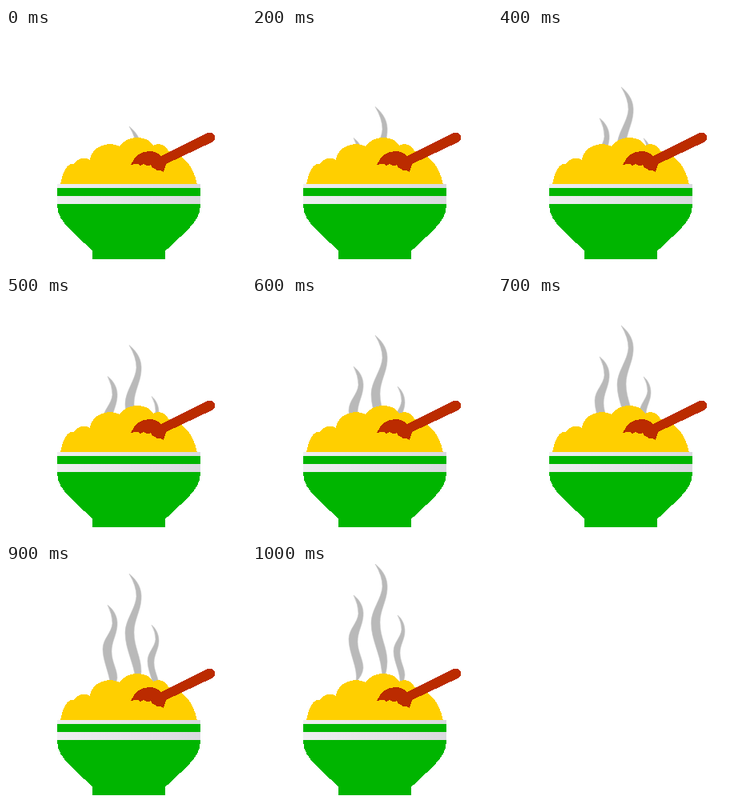
Recreate the animation shown at these times as an HTML page. Size 300 px wide and 300 px high, loop 1100 ms.

```html
<!DOCTYPE html>
<html lang="en">
<head>
<meta charset="utf-8">
<title>Steaming bowl</title>
<style>
html, body { margin: 0; width: 100%; height: 100%; overflow: hidden; background: #fff; }
svg { display: block; width: 300px; height: 300px; }
</style>
</head>
<body>
<svg viewBox="0 0 300 300">
  <defs>
    <linearGradient id="band">
      <stop offset="0" stop-color="#efeff1"/>
      <stop offset="1" stop-color="#d9d9de"/>
    </linearGradient>
  </defs>

  <!-- Steam at its highest point -->
  <g id="steam" fill="#b9b9b9" stroke="#c6c6c6" stroke-width=".6">
    <path d="M154 0C165 9 170 19 169 32C168 47 160 58 160 73C160 92 169 104 169 122Q169 134 164 146Q163 139 162 132C160 112 149 94 149 74C149 57 162 44 163 28Q163 15 154 0Z"/>
    <path d="M127 39C135 45 140 54 139 65C138 77 132 85 132 97C132 110 139 119 139 130Q138 140 130 147C133 130 121 112 121 94C121 81 132 74 133 62Q133 51 127 39Z"/>
    <path d="M182 64C188 69 191 76 191 84C191 94 185 101 185 111C185 122 191 130 191 139L189 150H185C186 135 177 123 177 109C177 98 186 92 187 82Q187 73 182 64Z"/>
  </g>

  <g shape-rendering="crispEdges">
    <path fill="#ffcf00" d="M68 196C69 188 72 179 76 174Q80 169 85 170Q89 163 97 163Q102 163 105 165C106 153 117 146 129 145Q136 145 142 148C147 140 156 137 165 137C174 137 181 141 184 147Q189 144 195 146Q201 149 203 154C223 158 235 174 239 196Z"/>

    <path fill="#00b500" d="M64 199H243V222C243 244 217 260 199 279V289H108V279C91 260 64 244 64 222Z"/>
    <path fill="url(#band)" d="M64 195H243V200H64ZM64 210H243V220H64Z"/>

    <path fill="#bb2b00" d="M156 171C161 159 169 154 180 154Q188 154 194 160L250 132C256 129 262 132 261 138Q261 141 257 143L200 170Q199 173 197 180L193 178Q189 179 186 176Q182 175 181 171Q178 174 174 171Q171 169 168 173Q166 169 162 170Z"/>
  </g>
</svg>
<script>
const LOOP = 1100, STEP = 100, RISE = 12.3;
const steam = document.getElementById("steam");
const lastStep = LOOP / STEP - 1;

function draw() {
  const step = Math.floor(performance.now() % LOOP / STEP);
  steam.setAttribute("transform", `translate(0 ${(lastStep - step) * RISE})`);
  requestAnimationFrame(draw);
}
draw();
</script>
</body>
</html>
```
